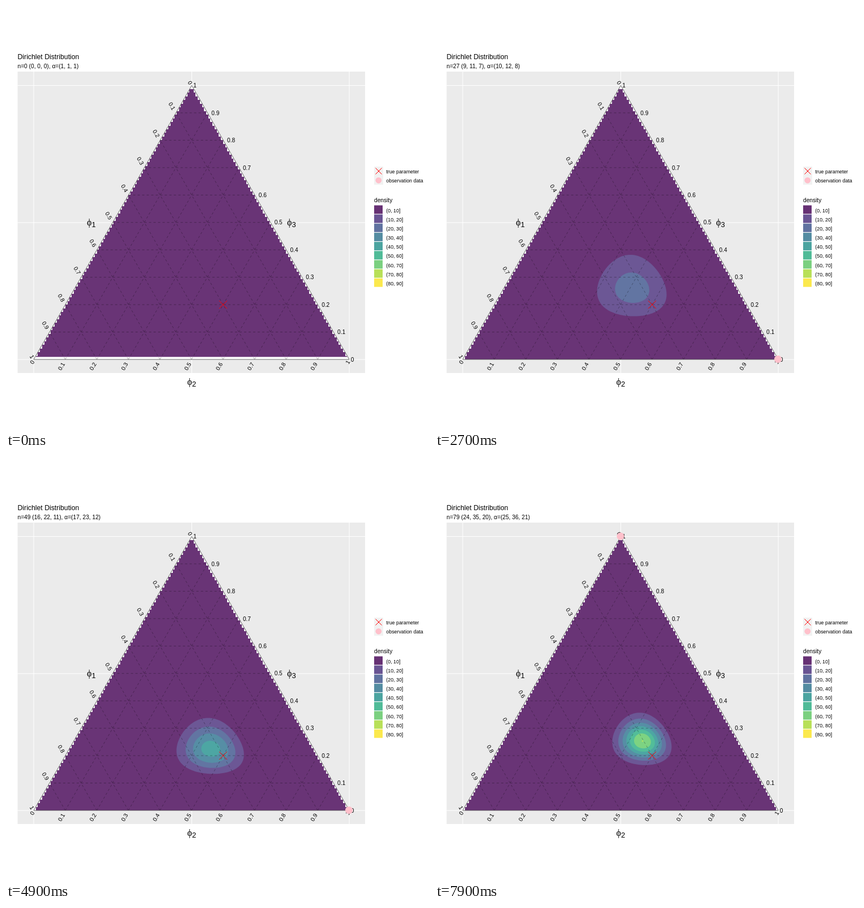
Animation of 748 by 748 pixels, one loop 8 s. Source, as an HTML page:

```html
<!DOCTYPE html>
<html>
<head>
<meta charset="utf-8">
<style>
html, body { margin: 0; width: 100%; height: 100%; overflow: hidden; background: #fff; }
svg { display: block; width: 748px; height: 748px; font-family: "Liberation Sans", Arial, sans-serif; }
.phi { font-family: "Liberation Serif", "DejaVu Serif", serif; }
</style>
</head>
<body>
<svg id="stage" viewBox="0 0 748 748"></svg>
<script>
const stage = document.getElementById('stage');

function add(tag, attrs, parent = stage, text) {
  const el = document.createElementNS('http://www.w3.org/2000/svg', tag);
  for (const key in attrs) el.setAttribute(key, attrs[key]);
  if (text !== undefined) el.textContent = text;
  parent.appendChild(el);
  return el;
}
const label = (x, y, size, text, more) => add('text', { x, y, 'font-size': size, ...more }, stage, text);
const line = (a, b, more) => add('line', { x1: a[0], y1: a[1], x2: b[0], y2: b[1], ...more });
const cross = (x, y, r) => add('path', {
  d: `M${x - r} ${y - r}l${2 * r} ${2 * r}m0 ${-2 * r}l${-2 * r} ${2 * r}`, stroke: '#f00', fill: 'none'
});

// Corners for the first, second and third category
const corners = [[49, 625], [607, 625], [328.5, 140.5]];
const place = p => [0, 1].map(k => p.reduce((sum, v, i) => sum + v * corners[i][k], 0));

const viridis = ['440154', '472d7b', '3b528b', '2c728e', '21908c', '27ad81', '5dc863', 'aadc32', 'fde725'];
const tint = (hex, back) => 'rgb(' + [0, 2, 4].map(i =>
  Math.round(parseInt(hex.substr(i, 2), 16) * 0.8 + back * 0.2)) + ')';

// Panel
add('rect', { x: 20.5, y: 116, width: 614.5, height: 533, fill: '#ebebeb' });
for (const x of [49, 328.5, 607]) line([x, 116], [x, 649], { stroke: '#fff' });
for (const y of [140.5, 383, 625]) line([20.5, y], [635, y], { stroke: '#fff' });
add('polygon', { points: corners.join(' '), fill: '#fff' });

// Density area, limited to the cells of a regular grid
const rows = 75, cellW = 558 / 150, cellH = 484.5 / rows;
let left = '', right = '';
for (let r = 0; r < rows - 1; r++) {
  const x0 = 49 + (r + 1) * cellW, x1 = 607 - (r + 1) * cellW;
  const y0 = 625 - r * cellH, y1 = y0 - cellH;
  left += `L${x0} ${y0}L${x0} ${y1}`;
  right = `L${x1} ${y1}L${x1} ${y0}` + right;
}
const stairs = 'M' + (left + right).slice(1) + 'Z';
add('path', { d: stairs }, add('clipPath', { id: 'cells' }));
add('path', { d: stairs, fill: tint(viridis[0], 255), 'shape-rendering': 'crispEdges' });
const bandGroup = add('g', { 'clip-path': 'url(#cells)' });
const bands = viridis.slice(1).map(c => add('path', { fill: tint(c, 255) }, bandGroup));
const gap = add('rect', { x: 52, y: 620.5, width: 552, height: 4.5, fill: '#fff' });

// Ternary grid, border and tick labels
for (let i = 1; i < 10; i++) {
  const v = i / 10, u = 1 - v;
  const dash = { stroke: '#000', 'stroke-opacity': 0.35, 'stroke-width': 0.9, 'stroke-dasharray': '4 4' };
  line(place([u, 0, v]), place([0, u, v]), dash);
  line(place([u, v, 0]), place([0, v, u]), dash);
  line(place([v, u, 0]), place([v, 0, u]), dash);
}
add('polygon', { points: corners.join(' '), fill: 'none', stroke: '#555', 'stroke-width': 0.9 });

function tick(p, v, angle, side) {
  const [x, y] = place(p), w = v % 1 ? 13.9 : 5.56, a = angle * Math.PI / 180;
  const cx = x + side * w * Math.cos(a), cy = y + side * w * Math.sin(a);
  add('text', {
    transform: `translate(${cx} ${cy}) rotate(${angle})`, y: 3.7, 'font-size': 10.1, 'text-anchor': 'middle'
  }, stage, v);
}
for (let i = 0; i <= 10; i++) {
  const v = i / 10, u = 1 - v;
  tick([v, 0, u], v, 60, -1);
  tick([u, v, 0], v, -60, -1);
  tick([0, u, v], v, 0, 1);
}
[[143, 388], [320.5, 670], [497, 388]].forEach(([x, y], i) => {
  label(x, y, 16, 'ϕ', { class: 'phi' });
  label(x + 8.5, y + 3, 13, i + 1);
});

// Titles and legend
label(20.5, 93.5, 12.25, 'Dirichlet Distribution');
const subtitle = label(20.5, 110, 10.2, '');
add('rect', { x: 651, y: 284, width: 16, height: 32, fill: '#f2f2f2' });
cross(659, 292, 5.5);
add('circle', { cx: 658.8, cy: 308.3, r: 5.4, fill: '#ffc0cb' });
label(672.3, 296, 8.85, 'true parameter');
label(672.3, 312, 8.85, 'observation data');
label(651, 346.5, 10.2, 'density');
viridis.forEach((c, i) => {
  const y = 352.5 + i * 16.15;
  add('rect', { x: 651, y, width: 15, height: 15, fill: tint(c, 242) });
  label(672.3, y + 12.2, 8.85, `(${i * 10}, ${i * 10 + 10}]`);
});

cross(...place([0.3, 0.5, 0.2]), 7);
const dot = add('circle', { r: 6.6, fill: '#ffc0cb' });

// One observed category per step
const draws = '1213121212132' + '32132321232132' + '221232212321' + '1231212312' +
  '2122123212122312123' + '32312332133';

const logFact = n => n > 1 ? Math.log(n) + logFact(n - 1) : 0;

// Outline of the region above a level: search along rays from the mode
function outline(counts, n, level) {
  const base = logFact(n + 2) - counts.reduce((s, c) => s + logFact(c), 0) - Math.log(level);
  const above = p => p.every(v => v > -1e-9) &&
    counts.reduce((s, c, i) => c ? s + c * Math.log(Math.max(p[i], 0)) : s, base) > 0;
  const mode = counts.map(c => c / n);
  if (!above(mode)) return '';
  const points = [];
  for (let i = 0; i < 180; i++) {
    const a = i * Math.PI / 90, up = Math.sin(a) * 2 / Math.sqrt(3), across = Math.cos(a);
    const dir = [-across - up / 2, across - up / 2, up];
    let lo = 0, hi = 1;
    for (let k = 0; k < 18; k++) {
      const mid = (lo + hi) / 2;
      if (above(mode.map((m, j) => m + dir[j] * mid))) lo = mid; else hi = mid;
    }
    points.push(place(mode.map((m, j) => m + dir[j] * lo)).map(v => v.toFixed(2)).join(' '));
  }
  return 'M' + points.join('L') + 'Z';
}

function show(n) {
  const counts = [0, 0, 0];
  for (const d of draws.slice(0, n)) counts[d - 1]++;
  subtitle.textContent = `n=${n} (${counts.join(', ')}), α=(${counts.map(c => c + 1).join(', ')})`;
  bands.forEach((band, i) => band.setAttribute('d', n ? outline(counts, n, 10 * (i + 1)) : ''));
  gap.style.display = n ? 'none' : '';
  dot.style.display = n ? '' : 'none';
  if (n) {
    const [x, y] = corners[draws[n - 1] - 1];
    dot.setAttribute('cx', x - 0.5);
    dot.setAttribute('cy', y - 0.5);
  }
}

let shown = -1;
const start = performance.now();
function tickFrame() {
  const n = Math.floor((performance.now() - start) % 8000 / 100);
  if (n !== shown) show(shown = n);
  requestAnimationFrame(tickFrame);
}
tickFrame();
</script>
</body>
</html>
```
